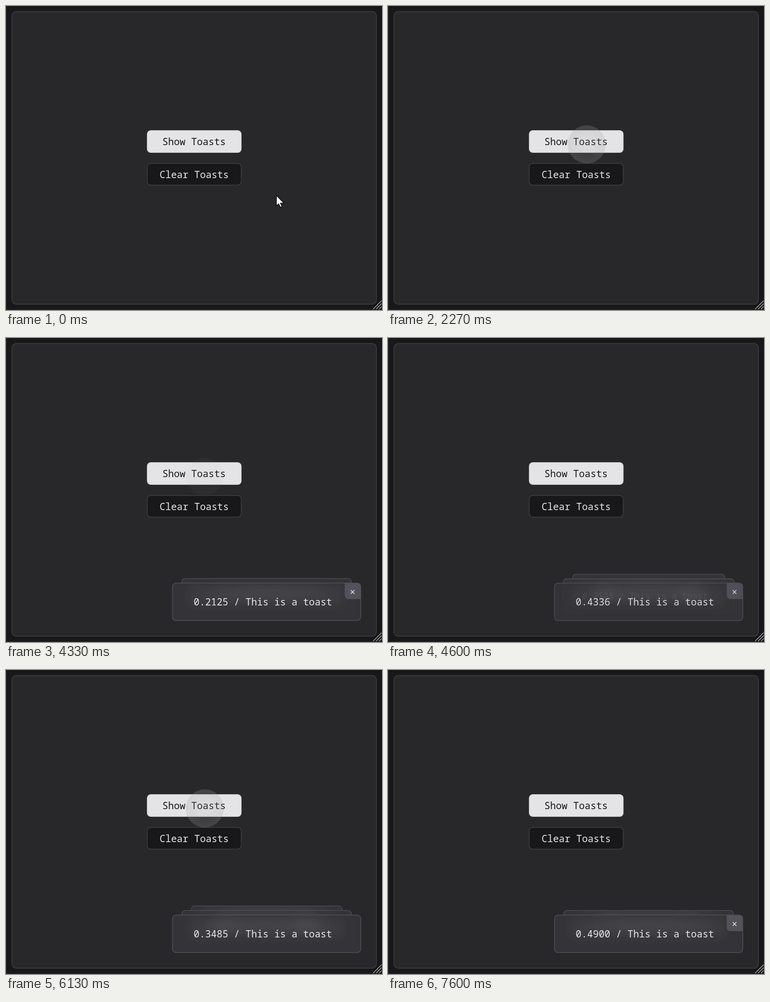
Write an HTML page that moves like this. It is 832 px wide and 673 px high and loops after 8000 ms.

```html
<!DOCTYPE html>
<html lang="en">
<head>
<meta charset="utf-8">
<title>Toasts</title>
<style>
  html, body { margin: 0; height: 100%; overflow: hidden; background: #18181a; }
  svg { display: block; width: 832px; height: 673px; }
  text {
    font: 21.28px "Noto Sans Mono", "DejaVu Sans Mono", monospace;
    fill: #e8e8ea;
    white-space: pre;
  }
  .mid { text-anchor: middle; }
  .card { fill: #343338; stroke: #52525a; stroke-width: 1.5; }
  .cursor { fill: #fff; stroke: #000; stroke-width: 1.2; stroke-linejoin: round; }
</style>
</head>
<body>
<svg viewBox="0 0 832 673">
  <defs>
    <radialGradient id="press">
      <stop offset="0" stop-color="#a0a0a0" stop-opacity=".1"/>
      <stop offset="1" stop-color="#a0a0a0" stop-opacity=".25"/>
    </radialGradient>
    <filter id="blur" x="-50%" y="-150%" width="200%" height="400%">
      <feGaussianBlur stdDeviation="14"/>
    </filter>
    <clipPath id="inside"><rect x="369" y="543" width="415.5" height="82" rx="7"/></clipPath>
  </defs>

  <path d="M.5 0V672.5H832" fill="none" stroke="#2b2b2d"/>
  <rect x="13" y="12.25" width="806.75" height="648" rx="10" fill="#28282a" stroke="#424245" stroke-width="1.4"/>
  <path d="M812.5 671 831 652.5M819 671 831 659M825.5 671 831 665.5" stroke="#b0b0b0" stroke-width="1.5"/>

  <rect x="312.5" y="275.75" width="208" height="48.5" rx="8" fill="#e4e4e6" stroke="#d2d2d5" stroke-width="1.4"/>
  <text class="mid" x="416.2" y="308" style="fill:#18181a">Show Toasts</text>
  <rect x="312.5" y="348.5" width="208" height="48" rx="8" fill="#18181a" stroke="#424246" stroke-width="1.4"/>
  <text class="mid" x="416.4" y="380.5">Clear Toasts</text>

  <g id="toasts"></g>
  <circle id="ripple" cx="439.8" cy="306.4" fill="url(#press)"/>
  <path id="arrow" class="cursor" d="M.5.5V23.3L5.5 18.8 9.2 26.6 12.6 25.1 9 17.3H16.6Z"/>
  <path id="hand" class="cursor" d="M-2 21V3a2.5 2.5 0 0 1 5 0V12q2.5-1 4 .8 2.5-.8 4 1.2 3-.5 3.3 2.5V23q0 3-2 6V32.5H.5V29L-7 20q-2.5-4 .5-4.3 1.5 0 4.5 5.3Z"/>
</svg>

<script>
const LOOP = 8000, STEP = 1000 / 15;
const FADE = 250, DELAY = 112, EXPIRE = 7345, EXPIRED = 2, HIDE_CURSOR = 2128;
const toasts = [
  { click: 2202, value: '0.1489' },
  { click: 3405, value: '0.2125' },
  { click: 4322, value: '0.4336' },
  { click: 5138, value: '0.3485' },
  { click: 6068, value: '0.4900' }
];
// time, x, y of the pointer
const path = [
  [140, 598, 419], [330, 577, 392], [530, 518, 333], [700, 428, 293], [860, 316, 303],
  [1000, 240, 348], [1067, 237, 380], [1133, 263, 405], [1200, 316.5, 411],
  [1267, 350, 414.5], [1400, 405, 391], [1530, 436, 345], [1640, 440, 315], [1730, 438, 306.3]
];

const $ = id => document.getElementById(id);
const clamp = v => Math.min(1, Math.max(0, v));
const bezier = (a, b, s) => 3 * a * s * (1 - s) ** 2 + 3 * b * s * s * (1 - s) + s ** 3;

// CSS "ease"
function ease(x) {
  x = clamp(x);
  if (x === 0 || x === 1) return x;
  let lo = 0, hi = 1;
  for (let i = 0; i < 20; i++) {
    const m = (lo + hi) / 2;
    if (bezier(.25, .25, m) < x) lo = m; else hi = m;
  }
  return bezier(.1, 1, lo);
}

toasts.forEach((toast, i) => {
  const g = document.createElementNS('http://www.w3.org/2000/svg', 'g');
  const haze = i < 1 ? '' : `
    <rect x="405" y="550" width="340" height="42" fill="#fff" opacity=".05" filter="url(#blur)"/>
    <ellipse cx="576" cy="561" rx="135" ry="13" fill="#fff" opacity=".05" filter="url(#blur)"/>`;
  const spots = i < 2 ? '' : [482, 670].map(x =>
    `<ellipse cx="${x}" cy="566" rx="36" ry="14" fill="#fff" opacity=".05" filter="url(#blur)"/>`).join('');
  g.innerHTML = `
    <rect class="card" x="368.5" y="542.5" width="416.5" height="83" rx="8"/>
    <g clip-path="url(#inside)">${haze}<g class="spots">${spots}</g></g>
    <text x="415.2" y="592">${toast.value} / This is a toast</text>
    <g class="close">
      <path d="M749.5 542.5H777a8 8 0 0 1 8 8V578H757.5a8 8 0 0 1-8-8Z" fill="#52525a"/>
      <text class="mid" x="767" y="569.6">×</text>
    </g>`;
  $('toasts').append(g);
  toast.g = g;
  toast.close = g.querySelector('.close');
  toast.spots = g.querySelector('.spots');
});

function drawToasts(t) {
  const gone = ease((t - EXPIRE) / FADE);
  let level = 0;
  for (let i = toasts.length - 1; i >= 0; i--) {
    const { click, g, close, spots } = toasts[i];
    const shown = ease((t - click - DELAY) / FADE);
    const excess = clamp(level - 2);
    const depth = excess ? 2 - 2 * excess : level;
    let alpha = shown * (1 - excess);
    if (i === EXPIRED) alpha *= 1 - gone;
    const next = toasts[i + 1];
    g.setAttribute('opacity', alpha);
    g.setAttribute('transform',
      `translate(576.75 ${584 - 14.2 * depth}) scale(${1 - .1 * depth}) translate(-576.75 -584)`);
    close.setAttribute('opacity', next && t > next.click + 30 ? 0 : 1);
    spots.setAttribute('opacity', i === toasts.length - 1 ? 1 - gone : 1);
    level += shown;
  }
}

function drawRipple(t) {
  const last = toasts.filter(toast => toast.click <= t).pop();
  const age = last ? t - last.click : 1e4;
  const out = Math.max(0, age - 62) / 67;
  $('ripple').setAttribute('r', Math.max(0, age < 30 ? 41 : 42.3 - 5 * out));
  $('ripple').setAttribute('opacity', clamp(Math.min(age / 55, 1 - .35 * out)));
}

// Non-uniform cubic Hermite through the path points
function pointer(t) {
  const end = path.length - 1;
  if (t <= path[0][0]) return path[0].slice(1);
  if (t >= path[end][0]) return path[end].slice(1);
  const i = path.findIndex(p => p[0] > t) - 1;
  const a = path[i], b = path[i + 1], h = b[0] - a[0], s = (t - a[0]) / h;
  const slope = (k, d) => k === 0 || k === end ? 0 :
    (path[k + 1][d] - path[k - 1][d]) / (path[k + 1][0] - path[k - 1][0]);
  return [1, 2].map(d =>
    a[d] * (1 + 2 * s) * (1 - s) ** 2 + h * slope(i, d) * s * (1 - s) ** 2 +
    b[d] * s * s * (3 - 2 * s) + h * slope(i + 1, d) * s * s * (s - 1));
}

function drawCursor(t) {
  const [x, y] = pointer(t);
  const over = x > 312 && x < 521 && (y > 275 && y < 325 || y > 348 && y < 397);
  const visible = t < HIDE_CURSOR;
  for (const [id, on] of [['arrow', !over], ['hand', over]]) {
    $(id).setAttribute('transform', `translate(${x} ${y})`);
    $(id).style.display = visible && on ? '' : 'none';
  }
}

function frame() {
  const now = performance.now() % LOOP;
  const t = Math.floor((now + 4) / STEP) * STEP % LOOP;
  drawToasts(t);
  drawRipple(t);
  drawCursor(t);
  requestAnimationFrame(frame);
}
frame();
</script>
</body>
</html>
```
